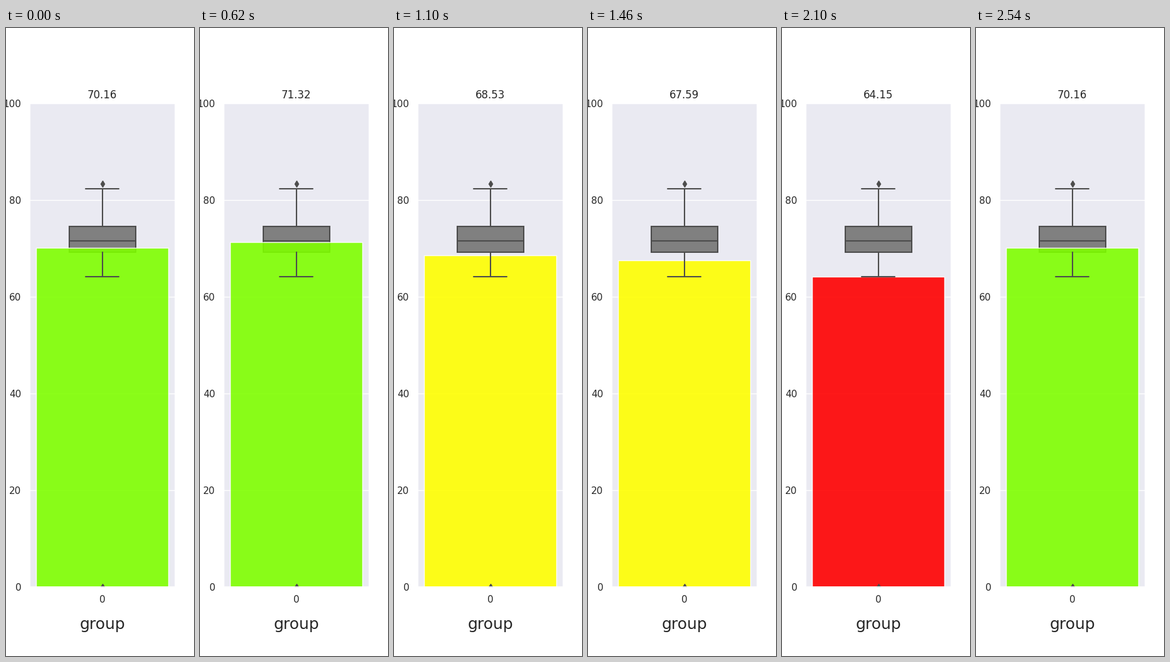
A matplotlib script for the animation above (2560 ms loop, 300 px wide and 1000 px high).

```python
import matplotlib.pyplot as plt
import numpy as np
from matplotlib.animation import FuncAnimation
from matplotlib.patches import Rectangle

TICK_MS = 20
TICKS = 128
INK = "#262626"
LINE = "#4c4c4c"
Q1, MEDIAN, Q3 = 69.22, 71.56, 74.57
LOW, HIGH, PEAK = 64.15, 82.36, 83.4

# Measured levels (sample index, value); samples between them are eased.
KEYS = np.array([
    (0, 70.16), (4, 74.8), (7, 71.3), (10, LOW), (14, 70.9), (17, 72.53),
    (19, PEAK), (20, HIGH), (23, 74.1), (26, 67.59), (29, 71.2), (31, 73.2),
])

plt.rcParams["font.family"] = "DejaVu Sans"
fig = plt.figure(figsize=(3, 10), dpi=100, facecolor="white")
ax = fig.add_axes([0.125, 0.11, 0.775, 0.77], facecolor="#eaeaf2")
ax.set(xlim=(-0.44, 0.44), ylim=(0, 100), xticks=[0], xticklabels=["0"],
       yticks=range(0, 101, 20))
ax.set_axisbelow(True)
ax.grid(axis="y", color="white", lw=1)
ax.tick_params(length=0, pad=9.5, labelsize=11, labelcolor=INK)
for spine in ax.spines.values():
    spine.set(color="white", linewidth=1.25)
ax.set_xlabel("group", fontsize=18, color=INK, labelpad=14)
title = ax.set_title("", fontsize=12, color=INK, pad=6)


def stroke(xs, ys):
    ax.plot(xs, ys, color=LINE, lw=1.5, solid_capstyle="round")


def rect(x, y, width, height, **style):
    return ax.add_patch(Rectangle((x, y), width, height, **style))


rect(-0.2, Q1, 0.4, Q3 - Q1, fc="#808080", ec=LINE, lw=1.5)
bar = rect(-0.4, 0, 0.8, 0, ec="white", lw=1, alpha=0.9)
for start, end in ((Q1, LOW), (Q3, HIGH)):
    stroke([0, 0], [start, end])
    stroke([-0.1, 0.1], [end, end])
stroke([-0.2, 0.2], [MEDIAN, MEDIAN])
ax.plot([0, 0], [0, PEAK], ls="", marker="d", ms=5, color=LINE)


def sample_index(tick):
    """Play forward then backward, resting on every fourth sample."""
    group, step = divmod(min(tick, TICKS - 1 - tick), 8)
    return 4 * group + (3 if step == 7 else min(step, 2))


def level(index):
    i = min(np.searchsorted(KEYS[:, 0], index, side="right") - 1, len(KEYS) - 2)
    (x0, y0), (x1, y1) = KEYS[i], KEYS[i + 1]
    u = (index - x0) / (x1 - x0)
    return round(float(y0 + (y1 - y0) * u * u * (3 - 2 * u)), 2)


def bar_color(value):
    if value <= LOW:
        return "#ff0000"
    return "#ffff00" if value < Q1 else "#7fff00"


def update(tick):
    value = level(sample_index(tick))
    bar.set_height(value)
    bar.set_facecolor(bar_color(value))
    title.set_text(str(value))
    return bar, title


anim = FuncAnimation(fig, update, frames=TICKS, interval=TICK_MS,
                     repeat=True, repeat_delay=0, blit=False)
plt.show()
```
